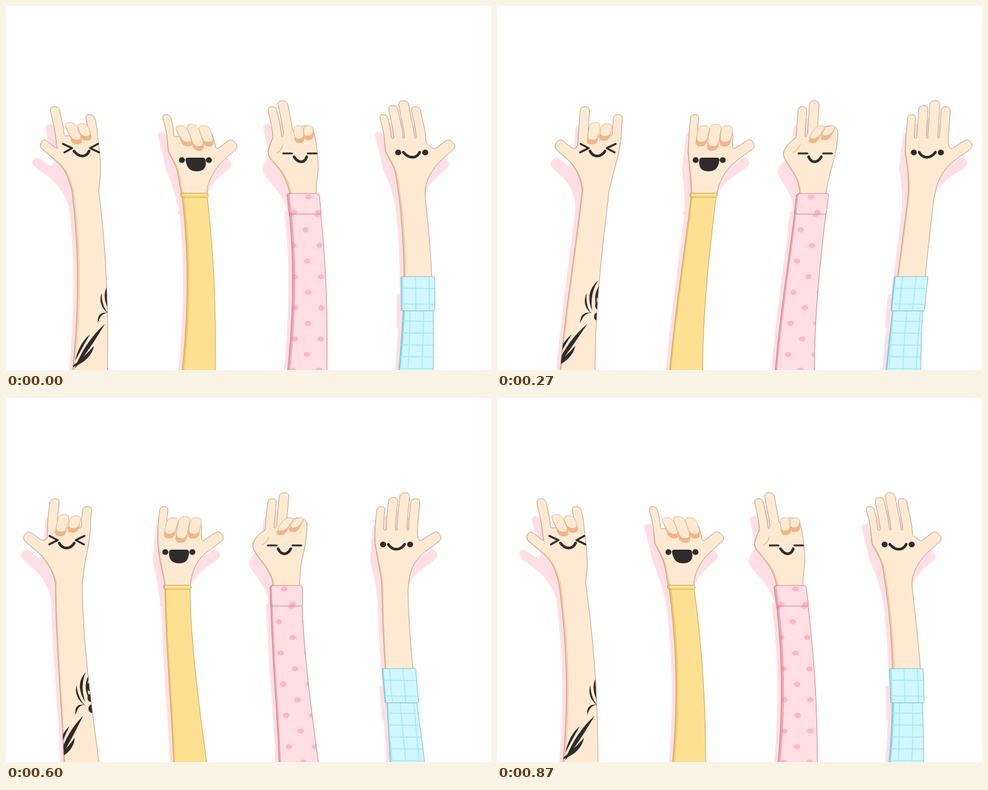
An HTML page with a canvas for the animation above (900 ms loop, 800x600 px).

```html
<!DOCTYPE html>
<html lang="en">
<head>
<meta charset="utf-8">
<title>Waving hands</title>
<style>
html, body { margin: 0; width: 100%; height: 100%; overflow: hidden; background: #fff; }
canvas { display: block; width: 800px; height: 600px; }
</style>
</head>
<body>
<canvas id="stage" width="800" height="600"></canvas>
<script>
const ctx = document.getElementById('stage').getContext('2d');
const LOOP = 900, STEP = 30, FLOOR = 612;
const INK = '#2e2b2a', SHADOW = '#ffdfe5', TIP = '#f4b485', SPOT = 'rgba(255,115,137,.36)';
const SKIN = { fill: '#feead2', shade: '#f8c99c', line: '#a98a76', rim: 2.6 };
const YELLOW = { fill: '#fee092', shade: '#f5c761', line: '#b8923f', rim: 3 };
const PINK = { fill: '#ffdee4', shade: '#f5a3b0', line: '#b56f7c', rim: 3.4 };
const BLUE = { fill: '#cff7fd', shade: '#86dae6', line: '#69b3be', rim: 2.4 };

let angle = 0, turn = 1;

const range = n => [...Array(n).keys()];
const smooth = (a, b, v) => {
  const t = Math.min(1, Math.max(0, (v - a) / (b - a)));
  return t * t * (3 - 2 * t);
};

// Sideways sway: fades and runs ahead towards the bottom of the stage.
const sway = y => (44 - 0.0825 * (y - 166)) * Math.sin(angle + 0.0037 * (y - 310));
// The palm turns a little in depth; k is how strongly a point follows.
const palm = (y, k) => sway(y) + 5 * k * turn * smooth(175, 222, y) * (1 - smooth(260, 305, y));
// Prints slide across the arm as it turns, the shadow swings the other way.
const print = y => sway(y) + 8 * turn;
const behind = y => sway(y) - 6 * turn * (1 - smooth(190, 290, y));

// Rounded outline from vertices [x, y, radius = 0, k = 1], bent by a shift function.
function outline(points, shift = palm, closed = true) {
  const path = new Path2D(), n = points.length;
  const v = points.map(([x, y, r = 0, k = 1]) => ({ x, y, r, k }));
  let last = null;
  const put = p => {
    const x = p.x + shift(p.y, p.k);
    if (last) path.lineTo(x, p.y); else path.moveTo(x, p.y);
    last = p;
  };
  const mix = (a, b, t) => ({ x: a.x + (b.x - a.x) * t, y: a.y + (b.y - a.y) * t, k: a.k + (b.k - a.k) * t });
  const lineTo = p => {
    if (!last) return put(p);
    const from = last, count = Math.ceil(Math.hypot(p.x - from.x, p.y - from.y) / 10) || 1;
    for (let i = 1; i <= count; i++) put(mix(from, p, i / count));
  };
  const toward = (a, b) => {
    const len = Math.hypot(b.x - a.x, b.y - a.y) || 1, sum = a.r + b.r;
    return mix(a, b, (sum > len ? a.r * len / sum : a.r) / len);
  };
  v.forEach((p, i) => {
    const end = !closed && (i === 0 || i === n - 1);
    if (!p.r || end) return lineTo(p);
    const a = toward(p, v[(i + n - 1) % n]), b = toward(p, v[(i + 1) % n]);
    lineTo(a);
    for (let j = 1; j <= 9; j++) put(mix(mix(a, p, j / 9), mix(p, b, j / 9), j / 9));
  });
  if (closed) { lineTo(v[0].r ? toward(v[0], v[n - 1]) : v[0]); path.closePath(); }
  return path;
}

function fill(path, color) { ctx.fillStyle = color; ctx.fill(path); }

function stroke(path, color, width) {
  ctx.strokeStyle = color;
  ctx.lineWidth = width;
  ctx.lineCap = ctx.lineJoin = 'round';
  ctx.stroke(path);
}

// Outline pieces, all clockwise.
function finger(x, top, width, leftBase, rightBase) {
  const h = width / 2;
  return [[x - h, leftBase, 2, 0], [x - h, top, h], [x + h, top, h], [x + h, rightBase, 2, 0]];
}

// side is negative for a thumb on the left; its size scales the reach.
function thumb(x, side, k) {
  const at = (dx, dy, r, follow = 1) => [x + side * dx, 225 + dy, r, follow];
  const points = [at(-33, 12, 6), at(-5, -7, 8, k), at(5, 7, 8, k), at(-35, 38, 15), at(-51, 66, 18)];
  return side < 0 ? points.reverse() : points;
}

// Forearm or sleeve that widens towards the floor.
function limb(x, half, top, bottom) {
  const count = Math.ceil((bottom - top) / 30);
  const edge = side => range(count + 1).map(i => {
    const y = top + (bottom - top) * i / count;
    return [x + side * (half + 7.8e-5 * (y - 310) ** 2), y, i % count ? 12 : 0];
  });
  return [...edge(1), ...edge(-1).reverse()];
}

function band(x, half, top, bottom, r) {
  return [[x - half, top, r], [x + half, top, r], [x + half, bottom, r], [x - half, bottom, r]];
}

// Each part is [points, tone, decorate]; decorate is clipped to the part.
function drawArm(...parts) {
  parts.forEach(([points]) =>
    fill(outline(points.map(([x, y, r]) => [x - 7.5, y + 29, r]), behind), SHADOW));
  parts.forEach(([points, tone, decorate]) => {
    const path = outline(points), rim = tone.rim + 0.7 * turn;
    fill(path, tone.shade);
    ctx.save();
    ctx.clip(path);
    fill(outline(points, (y, k) => palm(y, k) + rim * smooth(180, 290, y)), tone.fill);
    if (decorate) decorate();
    ctx.restore();
    stroke(path, tone.line, 0.8);
  });
}

function foldedFinger(x0, y0, x1, y1, width, k, kTop = 1) {
  const h = width / 2;
  const shape = (inset, lift) => outline([[x0 - h, y0, h, kTop], [x0 + h, y0, h, kTop],
    [x1 + h, y1 - lift, h, k], [x1 - h + inset, y1 - lift, h, k]]);
  fill(shape(0, 0), TIP);
  fill(shape(1.5, 7), SKIN.fill);
  stroke(shape(1.5, 7), '#d9a680', 0.7);
}

function dot(x, y, rx, ry, color, shift = palm) {
  ctx.fillStyle = color;
  ctx.beginPath();
  ctx.ellipse(x + shift(y, 1), y, rx, ry, 0, 0, 7);
  ctx.fill();
}

function pen(points, width) { stroke(outline(points, palm, false), INK, width); }

function smile(x, y, half) {
  pen([[x - half, y], [x - half * 0.6, y + 8.2, half], [x + half * 0.6, y + 8.2, half], [x + half, y]], 4.4);
}

function bothSides(drawEye) { [-1, 1].forEach(drawEye); }

function roundEyes(x, y) { bothSides(side => dot(x + 22.3 * side, y, 5, 4.7, INK)); }

// Tapered stroke of the tattoo.
function blade(x0, y0, cx, cy, x1, y1, fat) {
  fill(outline([[x0, y0], [cx, cy, 99], [x1, y1], [cx + fat, cy + fat * 0.3, 99]], print), INK);
}

function tattoo() {
  blade(156, 452, 135, 472, 151, 502, 9);
  blade(139, 473, 132, 493, 151, 508, 7);
  blade(133, 523, 131, 502, 152, 506, 7);
  blade(163, 453, 146, 476, 160, 500, 6);
  range(3).forEach(i => dot(161, 476 + 18 * i, 6, 7, INK, print));
  blade(145, 524, 111, 555, 98, 598, 14);
  blade(128, 560, 110, 582, 88, 598, 14);
  blade(121, 541, 103, 556, 98, 585, 8);
}

function rockArm() {
  drawArm([[...finger(102.2, 166, 15.5, 230, 214), ...finger(157.5, 179, 15, 214, 215), [164, 240, 20, 0],
    ...limb(131.5, 22.2, 305, FLOOR), ...thumb(61.5, -0.9, 1.7)], SKIN, tattoo]);
  range(2).reverse().forEach(i => foldedFinger(121 + 20 * i, 192 + 2 * i, 120 + 19 * i, 228 - 6 * i, 18.5, 1.9 - 0.5 * i));
  bothSides(side => pen([28.8, 14.9, 28.6].map((dx, i) => [129.4 + side * dx, 227.3 + 7 * i]), 3.2));
  smile(129.5, 239, 12.5);
}

function callArm() {
  drawArm(
    [[...finger(284, 179, 13.5, 240, 216), [350, 207, 6], ...thumb(385, 1, 1),
      ...limb(310.7, 21.5, 306, 314), [285, 272, 30]], SKIN],
    [limb(310.7, 20.6, 312, FLOOR), YELLOW],
    [band(310.5, 22.5, 308.5, 315, 2), YELLOW]);
  [2, 0, 1].forEach(i => {
    const mid = i % 2;
    foldedFinger(301.5 + 19.2 * i, 197 - 2 * mid, 300.5 + 19 * i, 231.5 + 7 * mid, 19, 2.2 - 0.4 * i);
  });
  roundEyes(315, 254);
  fill(outline([[298.5, 250, 5], [332, 250, 5], [331, 272.5, 16], [299.5, 272.5, 16]]), INK);
}

function spots() {
  range(33).forEach(i => {
    const row = i / 3 | 0;
    dot((row % 2 ? 480 : 458.5) + 43 * (i % 3), 343.3 + 25.7 * row, 5.3, 4.2, SPOT, print);
  });
}

function cuffSpots() {
  dot(490.5, 315, 5.3, 4.2, SPOT, print);
  bothSides(side => dot(484 + 20 * side, 340, 5.3, 4.2, SPOT, print));
}

function peaceArm() {
  drawArm(
    [[...finger(461, 166, 14.5, 217, 216), ...finger(480, 156, 16, 212, 206), [503, 197, 8, 0.7],
      [522, 199, 14, 0.2], [523, 238, 30, 0.2], [514, 285, 25], ...limb(490, 22, 306, 316),
      [465, 288, 20], [446, 262, 15], [434, 244, 12], [443, 226, 12]], SKIN],
    [limb(489.8, 25.8, 340, FLOOR), PINK, spots],
    [band(490, 26.5, 309, 343, 4), PINK, cuffSpots]);
  range(2).reverse().forEach(i => foldedFinger(495 + 17 * i, 197.5, 484 + 19 * i, 226 - 5 * i, 16.5, 2.3 - 0.6 * i, 1.7));
  stroke(outline([[451.5, 242], [460, 237, 8], [463, 229]], palm, false), TIP, 1.4);
  bothSides(side => pen([[489 + 13 * side, 243], [489 + 27.5 * side, 243]], 3));
  smile(489, 248.5, 10.5);
}

function plaid(x, top, bottom, gap) {
  const line = points => stroke(outline(points, print, false), '#a9e9f3', 1.7);
  range(4).forEach(i => line([[x + 22.3 * i, top], [x + 22.3 * i, bottom]]));
  for (let y = top + 19; y < bottom; y += gap) line([[x - 25, y], [x + 90, y + 1]]);
}

function openArm() {
  const tops = [179, 164, 156, 166];
  const fingers = tops.flatMap((top, i) =>
    finger(642 + 18.5 * i, top, 16.5 - (top - 156) * 0.14, i ? 218 : 240, i < 3 ? 218 : 226));
  drawArm(
    [[...fingers, ...thumb(744, 1, 1), ...limb(669.3, 21.5, 320, 452), [647, 282, 30]], SKIN],
    [limb(669, 22, 498, FLOOR), BLUE, () => plaid(625.6, 500, FLOOR, 19.6)],
    [band(669, 27.7, 446, 502.5, 2), BLUE, () => plaid(635, 446, 503, 26)]);
  roundEyes(673.7, 241.5);
  smile(673.5, 241, 13.5);
}

function draw(now) {
  const t = Math.floor((now % LOOP) / STEP) * STEP;
  angle = 2 * Math.PI * t / LOOP;
  turn = Math.cos(angle);
  ctx.fillStyle = '#fff';
  ctx.fillRect(0, 0, 800, 600);
  rockArm();
  callArm();
  peaceArm();
  openArm();
}

function tick() {
  draw(performance.now());
  requestAnimationFrame(tick);
}
tick();
</script>
</body>
</html>
```
